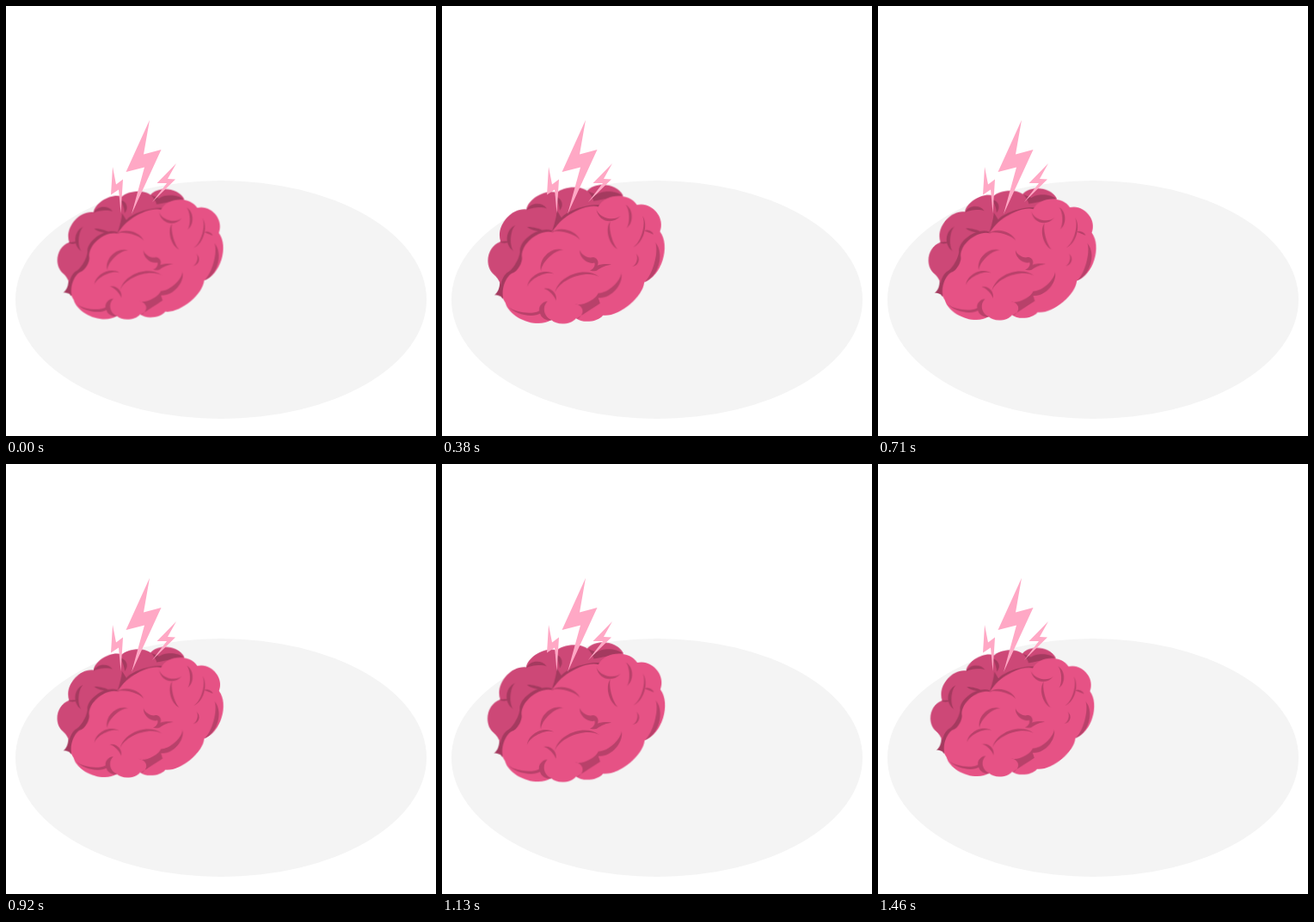
Write an HTML page that moves like this. It is 500x500 px and loops after 1.5 s.

```html
<!DOCTYPE html>
<html lang="en">
<head>
<meta charset="utf-8">
<title>Pulsing brain</title>
<style>
  html, body { margin: 0; width: 100%; height: 100%; overflow: hidden; background: #fff; }
  svg { display: block; width: 100vw; height: 100vh; }
  .floor { fill: #f4f4f4; }
  .back { fill: #cd4877; }
  .back-fold { fill: #a43a5f; }
  .front { fill: #e65285; }
  .fold { fill: #b8416a; }
  .bolt { fill: #ffa8c5; }
  .brain {
    transform-origin: 156.6px 289.3px;
    animation: beat 1.5s linear -30ms infinite;
  }
  @keyframes beat {
    0%, 60%, 100% { transform: scale(.99); }
    20%, 80% { transform: scale(1.089); }
  }
</style>
</head>
<body>
<svg viewBox="0 0 500 500">
  <ellipse class="floor" cx="250" cy="341.5" rx="239" ry="138.5"/>

  <g class="brain">
    <path class="back-fold" data-arcs="95 310 0, 69 309 0, 67 333 5, 80 340 2"/>
    <path class="back" data-arcs="77 338 0, 67 311 -3, 74 275 10, 102 240 11, 135 222 7, 168 220 5, 207 225 9, 190 260 0"/>
    <g class="back-fold">
      <path data-arcs="102 241 -2, 124 239 6"/>
      <path data-arcs="133 226 -1, 138 241 5"/>
      <path data-arcs="103 259 2, 120 263 1"/>
      <path data-arcs="90 257 4, 88 285 -8"/>
      <path data-arcs="73 275 2, 84 274 0"/>
      <path data-arcs="168 220 -1, 178 224 0, 206 225 4, 175 231 0"/>
      <path data-arcs="130 263 0, 95 284 -8, 82 308 3, 76 337 -5, 97 310 0"/>
      <path data-arcs="135 241 0, 129 265 1, 185 238 6, 186 236 0, 140 249 -5"/>
    </g>

    <path class="front" data-arcs="131 265 9, 180 237 8, 222 235 10.5, 247 264 11, 230 319 12, 185 355 9,
      156 358 5, 129 360 5, 79 341 11, 87 309 6, 97 291 -3"/>
    <g class="fold">
      <path data-arcs="129 265 -4, 160 273 7"/>
      <path data-arcs="118 307 -5, 142 284 9"/>
      <path data-arcs="160 284 5, 174 292 -3, 179 301 3, 194 300 1, 179 306 -1, 171 306 1, 176 298 -2"/>
      <path data-arcs="103 324 -5, 132 310 8"/>
      <path data-arcs="121 326 -2, 134 339 5"/>
      <path data-arcs="133 330 -9, 181 313 12"/>
      <path data-arcs="205 309 -8, 180 331 5, 155 343 4, 163 350 2, 156 359 2, 182 342 0, 180 336 0"/>
      <path data-arcs="83 346 5, 116 350 -4, 125 340 3, 130 360 -6, 117 353 3"/>
      <path data-arcs="178 240 9, 204 247 -6"/>
      <path data-arcs="193 253 3, 201 283 -6"/>
      <path data-arcs="210 235 -3, 211 260 6"/>
      <path data-arcs="228 247 -5, 218 281 7"/>
      <path data-arcs="230 263 0, 240 267 2"/>
      <path data-arcs="221 288 -3, 217 302 5"/>
      <path data-arcs="242 276 -10, 230 319 5"/>
    </g>
  </g>

  <g class="bolt">
    <path d="M167 132.5L139.5 193L161 187.5L146 242L180.5 167L160 172.5Z"/>
    <path d="M124 187L122 219.5L131 213.5L133.5 241L136 201.5L128 207.5Z"/>
    <path d="M198 183L175.5 206H187L170 228L197 201.5L188 201Z"/>
  </g>
</svg>
<script>
  // Each vertex is "x y bulge"; bulge bends the edge leading to it, left of travel.
  function edge([ax, ay], [bx, by, bulge]) {
    const dx = bx - ax, dy = by - ay;
    const k = bulge * 4 / 3 / Math.hypot(dx, dy);
    const at = t => `${ax + dx * t + dy * k} ${ay + dy * t - dx * k}`;
    return `C${at(.2)} ${at(.8)} ${bx} ${by}`;
  }

  for (const path of document.querySelectorAll('[data-arcs]')) {
    const pts = path.dataset.arcs.split(',').map(p => p.trim().split(' ').map(Number));
    const edges = pts.map((p, i) => edge(p, pts[(i + 1) % pts.length]));
    path.setAttribute('d', `M${pts[0][0]} ${pts[0][1]}${edges.join('')}Z`);
  }
</script>
</body>
</html>
```
